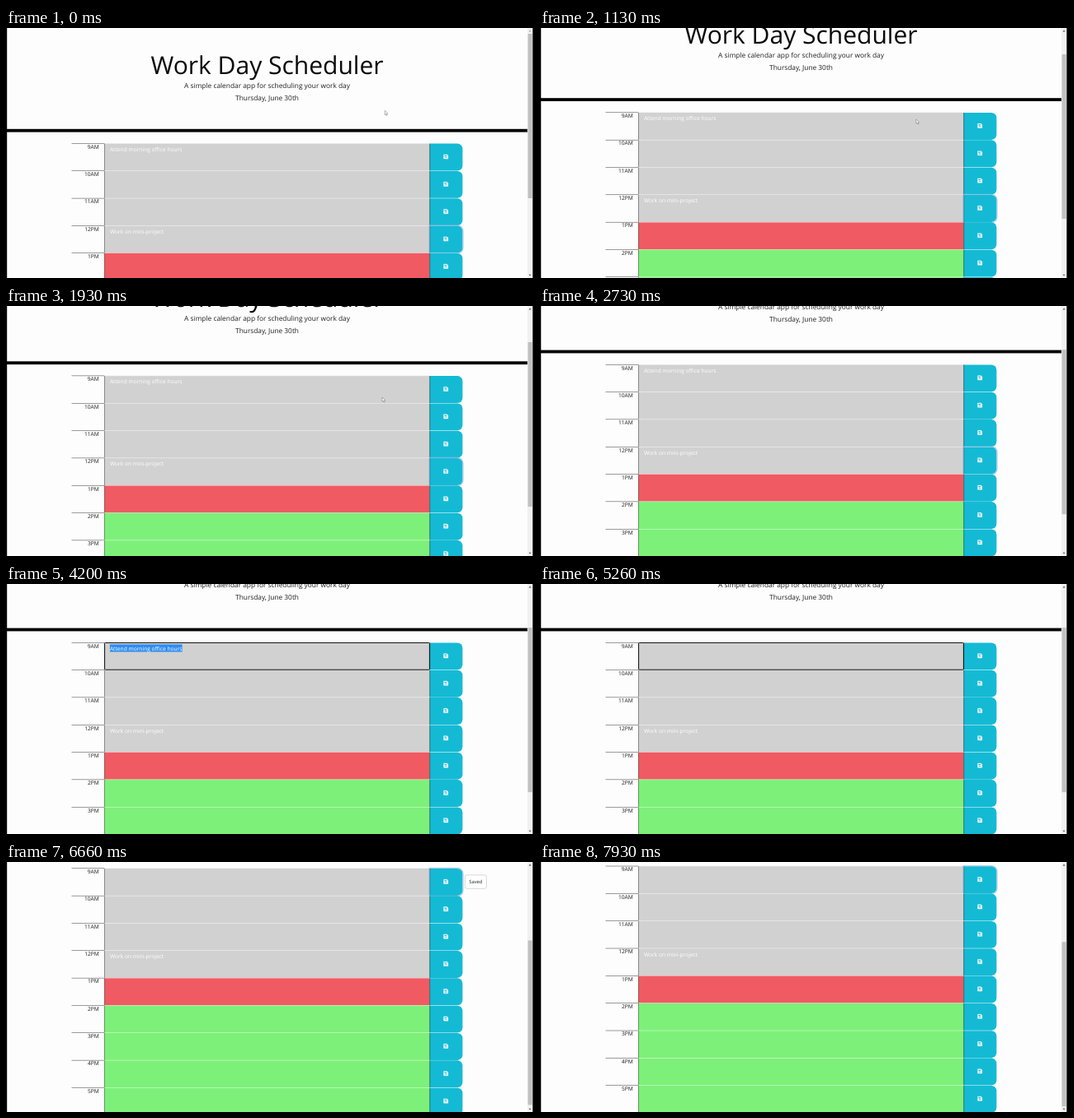
These frames come from a looping animation (640x304 px, 8 s). An HTML page with a canvas:

```html
<!DOCTYPE html>
<html lang="en">
<head>
<meta charset="utf-8">
<title>Work Day Scheduler</title>
<style>
  html, body { margin: 0; width: 100%; height: 100%; overflow: hidden; background: #000; }
  canvas { display: block; }
</style>
</head>
<body>
<canvas id="stage" width="640" height="304"></canvas>
<script>
const ctx = document.getElementById('stage').getContext('2d');
ctx.textRendering = 'geometricPrecision';
const LOOP = 8000;
const FONT = '"Open Sans", "Noto Sans", sans-serif';
const HOURS = ['9AM', '10AM', '11AM', '12PM', '1PM', '2PM', '3PM', '4PM', '5PM'];

const PAGE = '#fdfdfd', PAST = '#d1d1d1', PRESENT = '#f05a63', FUTURE = '#7df079', SAVE = '#14bad4';
const LEFT = 79.5, AREA = 119.3, BTN = 513.6, RIGHT = 553.4;
const ROWS_TOP = 140.2, ROW_H = 100 / 3, RADIUS = 6.25, HAIR = 0.42;

// Event times in ms
const FOCUS_AT = 3660, SELECT_AT = 3800, SELECT_END = 4130, DELETE_AT = 4800;
const CLICK_AT = 6060, POPOVER_AT = 6160, POPOVER_OUT = 6930;

const clamp01 = v => Math.min(1, Math.max(0, v));
const span = (t, a, b) => clamp01((t - a) / (b - a));
const mix = (a, b, p) => a + (b - a) * p;
const smooth = p => p * p * (3 - 2 * p);
const easeOut = p => 1 - (1 - p) ** 3;

function scrollAt(t) {
  return 54.8 * easeOut(span(t, 910, 1600))
       + 14.4 * smooth(span(t, 1880, 2260))
       + 66.2 * smooth(span(t, 6170, 6730));
}

function rect(x, y, w, h, color) {
  ctx.fillStyle = color;
  ctx.fillRect(x, y, w, h);
}

function text(str, x, y, size, color, align = 'left') {
  ctx.font = `${size}px ${FONT}`;
  ctx.textAlign = align;
  ctx.fillStyle = color;
  ctx.fillText(str, x, y);
}

function poly(points, fill, stroke, width = 0.6) {
  ctx.beginPath();
  points.forEach(([x, y]) => ctx.lineTo(x, y));
  ctx.closePath();
  ctx.fillStyle = fill;
  ctx.fill();
  if (stroke) {
    ctx.strokeStyle = stroke;
    ctx.lineWidth = width;
    ctx.stroke();
  }
}

function drawHeader(top) {
  const mid = 316.5;
  text('Work Day Scheduler', mid, top + 56.4, 30, '#0a0a0a', 'center');
  text('A simple calendar app for scheduling your work day', mid, top + 73.2, 8.333, '#1f1f1f', 'center');
  text('Thursday, June 30th', mid, top + 88.2, 8.333, '#1f1f1f', 'center');
  rect(0, top + 122.8, 632, 3.8, '#000');
}

function drawDisk(cx, cy, size, color) {
  const h = size / 2, cut = size * 0.24;
  poly([[cx - h, cy - h], [cx + h - cut, cy - h], [cx + h, cy - h + cut],
        [cx + h, cy + h], [cx - h, cy + h]], color, color, 0.4);
  rect(cx - h * 0.7, cy - h * 0.66, size * 0.55, size * 0.24, SAVE);
  ctx.beginPath();
  ctx.arc(cx, cy + h * 0.36, size * 0.16, 0, Math.PI * 2);
  ctx.fillStyle = SAVE;
  ctx.fill();
}

function drawButton(y, focused, hover) {
  const w = RIGHT - BTN, top = y + HAIR, h = ROW_H - HAIR;
  ctx.beginPath();
  ctx.roundRect(BTN, top, w, h, [0, RADIUS, RADIUS, 0]);
  ctx.fillStyle = SAVE;
  ctx.fill();
  rect(BTN, top, 0.5, h, '#111');
  if (focused) {
    ctx.beginPath();
    ctx.roundRect(BTN - 0.6, top - 0.6, w + 1.2, h + 1.2, [0.6, RADIUS + 0.6, RADIUS + 0.6, 0.6]);
    ctx.strokeStyle = 'rgba(140, 180, 225, 0.65)';
    ctx.lineWidth = 1.3;
    ctx.stroke();
  }
  drawDisk(533.2, y + 16.3, mix(5.2, 6.8, hover), hover > 0.5 ? '#1c2528' : '#fff');
}

function drawNote(str, y, selected) {
  const x = 125.9;
  if (selected > 0) {
    ctx.font = `6.667px ${FONT}`;
    rect(x, y + 2.4, ctx.measureText(str).width * selected, 9.1, '#2f8cf0');
  }
  text(str, x, y + 9.7, 6.667, '#fff');
}

function drawRow(i, y, t) {
  const color = i < 4 ? PAST : i === 4 ? PRESENT : FUTURE;
  rect(LEFT, y, AREA - LEFT, HAIR, '#111');
  text(HOURS[i], 112.8, y + 6.5, 6.667, '#1f1f1f', 'right');
  // Rows overlap slightly so that no background leaks through the seams
  rect(AREA, y, BTN - AREA, ROW_H + 0.5, color);
  rect(AREA, y, BTN - AREA, HAIR, '#fff');
  rect(AREA, y + HAIR, HAIR, ROW_H - HAIR, '#111');

  if (i === 0 && t < DELETE_AT) {
    drawNote('Attend morning office hours', y, span(t, SELECT_AT, SELECT_END));
  }
  if (i === 3) drawNote('Work on mini-project', y, 0);

  const focusRow = t < FOCUS_AT ? 3 : t >= CLICK_AT ? 0 : -1;
  const hover = i === 0 ? span(t, 5780, 5900) * (1 - span(t, 6150, 6250)) : 0;
  drawButton(y, i === focusRow, hover);
}

function drawFieldFocus(y) {
  ctx.beginPath();
  ctx.roundRect(AREA + 0.3, y + 0.5, BTN - AREA - 0.5, ROW_H - 0.6, 0.8);
  ctx.strokeStyle = '#111';
  ctx.lineWidth = 1;
  ctx.stroke();
}

function drawPopover(y, alpha) {
  ctx.globalAlpha = alpha;
  ctx.beginPath();
  ctx.roundRect(556.4, y + 8.3, 26, 16.4, 2.2);
  ctx.fillStyle = '#fff';
  ctx.fill();
  ctx.strokeStyle = '#c8c8c8';
  ctx.lineWidth = 0.7;
  ctx.stroke();
  text('Saved', 569.3, y + 18.6, 5.833, '#212529', 'center');
  ctx.globalAlpha = 1;
}

function drawScrollbar(scroll) {
  rect(632, 0, 6.4, 304, '#f1f1f1');
  rect(632.6, 7 + scroll * 2 / 3, 5.2, 200, '#c1c1c1');
  poly([[633.6, 4.4], [635.1, 2.6], [636.6, 4.4]], scroll > 0 ? '#505050' : '#a3a3a3');
  poly([[633.6, 299.8], [635.1, 301.6], [636.6, 299.8]], '#505050');
  rect(638.4, 0, 1.6, 304, '#000');
  rect(0, 0, 1.2, 304, '#000');
}

function drawArrow(x, y) {
  const shape = [[0, 0], [0, 5.2], [1.2, 4.2], [2, 6], [2.9, 5.6], [2.1, 3.9], [3.7, 3.8]];
  poly(shape.map(([a, b]) => [x + a, y + b]), '#fff', '#666', 0.5);
}

function drawHand(x, y) {
  const shape = [[0, 0], [0.9, 0], [1.1, 2.5], [3.5, 3.1], [3.6, 5.2], [2.9, 7.2],
                 [0.2, 7.2], [-1.5, 4.4], [-1, 3.9], [0, 4.6]];
  poly(shape.map(([a, b]) => [x + a, y + b]), '#fff', '#333', 0.5);
}

function drawPointer(t) {
  if (t < 2460) {
    const p = smooth(span(t, 30, 400));
    drawArrow(mix(459.2, 456, p), mix(100.4, 111, p));
  } else if (t >= 5750 && t < 6240) {
    const p = easeOut(span(t, 5720, 6040)), out = smooth(span(t, 6140, 6260));
    drawHand(mix(mix(515, 541.2, p), 512, out), mix(80, 83.6, p));
  }
}

function draw(t) {
  const scroll = scrollAt(t), first = ROWS_TOP - scroll;
  rect(0, 0, 640, 304, PAGE);
  drawHeader(-scroll);
  HOURS.forEach((_, i) => drawRow(i, first + i * ROW_H, t));
  if (t >= FOCUS_AT && t < CLICK_AT) drawFieldFocus(first);
  const shown = span(t, POPOVER_AT, POPOVER_AT + 150) * (1 - span(t, POPOVER_OUT - 20, POPOVER_OUT + 400));
  if (shown > 0) drawPopover(first, shown);
  drawScrollbar(scroll);
  drawPointer(t);
}

const start = performance.now();
function frame() {
  draw((performance.now() - start) % LOOP);
  requestAnimationFrame(frame);
}
frame();
</script>
</body>
</html>
```
